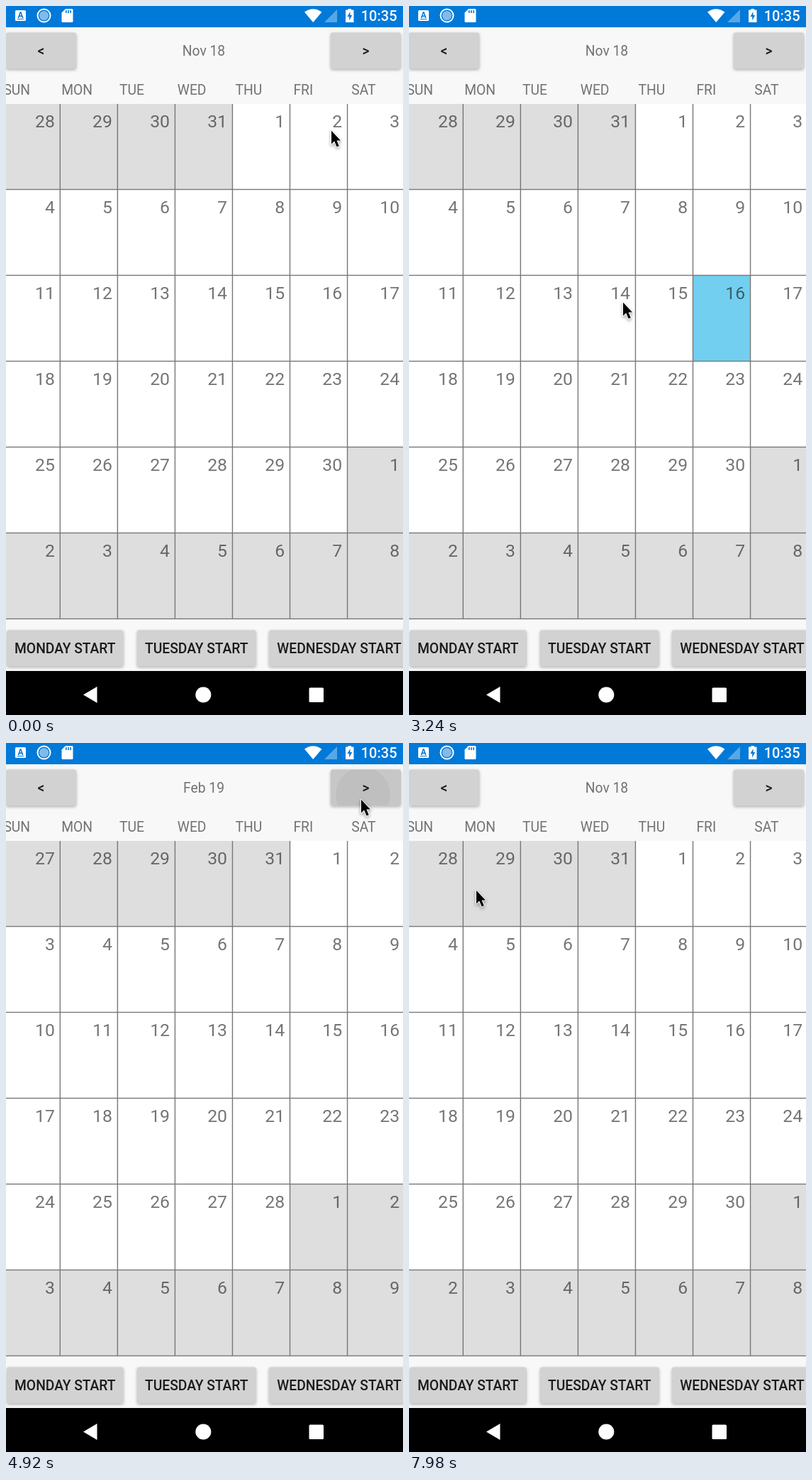
An HTML page with a canvas that plays this animation: 560x999 px, repeating every 8 s.

```html
<!DOCTYPE html>
<html lang="en">
<head>
<meta charset="utf-8">
<title>Calendar</title>
<style>
  html, body { margin: 0; width: 100%; height: 100%; overflow: hidden; background: #f8f8f8; }
  canvas { display: block; width: 560px; height: 999px; }
</style>
</head>
<body>
<canvas id="stage" width="560" height="999"></canvas>
<script>
const ctx = document.getElementById('stage').getContext('2d');
const LOOP = 8000, STEP = 60;
const BLUE = '#0179d8', INK = 'rgba(0,0,0,.54)', DARK = 'rgba(0,0,0,.87)';
const SMALL = 19.3, LARGE = 24.8;
const DAYS = ['SUN', 'MON', 'TUE', 'WED', 'THU', 'FRI', 'SAT'];
const MONTHS = ['Jan', 'Feb', 'Mar', 'Apr', 'May', 'Jun', 'Jul', 'Aug', 'Sep', 'Oct', 'Nov', 'Dec'];
const GRID = { top: 138, bottom: 863, colX: 76, colW: 81.05, rowY: 258, rowH: 121 };

// time, x, y
const POINTER = [
  [0, 459, 175], [700, 125, 455], [900, 125, 455], [1500, 285, 690], [1720, 285, 690],
  [2340, 407, 513], [2700, 440, 450], [2920, 440, 450], [3240, 302, 417], [3400, 302, 417],
  [3960, 501, 79], [5000, 501, 79], [5400, 67, 68], [6660, 67, 68], [7400, 95, 207], [8000, 95, 207]
];
// time, cell index
const PICKS = [[0, -1], [780, 15], [1620, 31], [2820, 19], [4120, -1]];
// press time, direction
const PRESSES = [[4040, 1], [4480, 1], [4760, 1], [5440, -1], [5780, -1], [6160, -1]];
const CHANGE_DELAY = 80;

const NAV = {
  '-1': { x: 0, w: 99, label: '<', hit: [67, 68] },
  '1': { x: 458, w: 99, label: '>', hit: [501, 79] }
};
const STARTS = [[1, 164.5, 'MONDAY START'], [185, 167.5, 'TUESDAY START'], [371, 198, 'WEDNESDAY START']];

function rect(x, y, w, h, fill) {
  ctx.fillStyle = fill;
  ctx.fillRect(x, y, w, h);
}

function rounded(x, y, w, h, r) {
  ctx.beginPath();
  ctx.roundRect(x, y, w, h, r);
}

function disc(x, y, r, fill) {
  ctx.beginPath();
  ctx.arc(x, y, r, 0, Math.PI * 2);
  ctx.fillStyle = fill;
  ctx.fill();
}

function shape(d, fill) {
  ctx.fillStyle = fill;
  ctx.fill(new Path2D(d));
}

function text(str, x, y, size, { align = 'left', weight = 400, fill = INK } = {}) {
  ctx.font = `${weight} ${size}px Roboto, sans-serif`;
  ctx.textAlign = align;
  ctx.fillStyle = fill;
  ctx.fillText(str, x, y);
}

function withShadow(color, blur, dy, draw) {
  ctx.save();
  ctx.shadowColor = color;
  ctx.shadowBlur = blur;
  ctx.shadowOffsetY = dy;
  draw();
  ctx.restore();
}

function button(x, y, w, label) {
  withShadow('rgba(0,0,0,.3)', 4, 1.5, () => {
    rounded(x, y, w, 51, 3);
    ctx.fillStyle = '#d2d2d2';
    ctx.fill();
  });
  text(label, x + w / 2, y + 32.5, SMALL, { align: 'center', weight: 500, fill: DARK });
}

function statusBar() {
  rect(0, 0, 560, 30, BLUE);
  rounded(13, 6, 15, 15, 1.5);
  ctx.fillStyle = '#fff';
  ctx.fill();
  text('A', 20.5, 17, 12, { align: 'center', weight: 700, fill: BLUE });
  rect(16, 18, 9, 1, BLUE);

  disc(53.5, 13.5, 10, '#fff');
  disc(53.5, 13.5, 8, BLUE);
  disc(53.5, 13.5, 6.6, '#80bbed');

  shape('M84 4H93Q94.5 4 94.5 5.5V21.5Q94.5 23 93 23H80Q78.5 23 78.5 21.5V9.5Z', '#fff');
  for (let i = 0; i < 3; i++) rect(84 + 3.2 * i, 6, 1.6, 4, BLUE);

  shape('M421 8.5Q433 0 445.5 8.5L433.2 23Z', '#fff');
  shape('M449 23L467 5V23Z', '#58a7e5');
  shape('M482.5 4H487V5.5H490.5V23H479V5.5H482.5Z', '#fff');
  shape('M485.5 8L481.5 15H484.2V20.5L488.2 13H485.5Z', BLUE);
  text('10:35', 551.5, 21, 20, { align: 'right', weight: 500, fill: '#fff' });
}

function calendar(offset, picked) {
  const month = new Date(2018, 10 + offset, 1);
  const title = `${MONTHS[month.getMonth()]} ${month.getFullYear() % 100}`;
  text(title, 279, 70, SMALL, { align: 'center' });
  DAYS.forEach((day, i) => text(day, -3.6 + 81.8 * i, 125, SMALL));

  const { top, bottom, colX, colW, rowY, rowH } = GRID;
  rect(0, top, 560, bottom - top, '#fff');
  for (let i = 0; i < 42; i++) {
    const col = i % 7, row = Math.floor(i / 7);
    const date = new Date(2018, 10 + offset, 1 + i - month.getDay());
    const outside = date.getMonth() !== month.getMonth();
    const x = Math.round(colX + (col - 1) * colW);
    const y = row ? rowY + (row - 1) * rowH : top;
    const h = rowY + row * rowH - y;
    if (i === picked) rect(x, y, 81, h, '#73cfef');
    else if (outside) rect(x, y, 81, h, '#dedede');
    text(date.getDate(), 68.9 + colW * col, 171 + rowH * row, LARGE, { align: 'right' });
  }
  for (let i = 0; i < 6; i++) {
    rect(colX - 0.4 + i * colW, top, 1.4, bottom - top, '#777');
    rect(0, rowY - 0.2 + i * rowH, 560, 1.4, '#777');
  }
}

function ripple(t) {
  const press = PRESSES.filter(p => p[0] <= t).pop();
  if (!press) return;
  const age = t - press[0];
  if (age >= 380) return;
  const { x, w, hit } = NAV[press[1]];
  const fade = age < 250 ? 1 : (380 - age) / 130;
  const drift = Math.min(1, age / 400);
  ctx.save();
  rounded(x, 37, w, 51, 3);
  ctx.clip();
  rect(x, 37, w, 51, `rgba(0,0,0,${0.05 * fade})`);
  disc(hit[0] + (x + w / 2 - hit[0]) * drift, hit[1] + (63 - hit[1]) * drift,
    Math.min(70, age * 0.24), `rgba(0,0,0,${0.04 * fade})`);
  ctx.restore();
}

function navBar() {
  rect(0, 937, 560, 62, '#000');
  shape('M109 970.5L128.5 959V982Z', '#fff');
  disc(278.3, 970.5, 11, '#fff');
  rounded(427.5, 960.5, 20.5, 20.5, 1.5);
  ctx.fillStyle = '#fff';
  ctx.fill();
}

function pointer(t) {
  const next = POINTER.findIndex(p => p[0] > t);
  const [t0, x0, y0] = POINTER[next - 1], [t1, x1, y1] = POINTER[next];
  const p = (t - t0) / (t1 - t0), e = p * p * (3 - 2 * p);
  const arrow = new Path2D('M0 .8V19.5L4.2 15.6L7.6 23.6L10.8 22.2L7.5 14.4H13Z');
  ctx.save();
  ctx.translate(x0 + (x1 - x0) * e, y0 + (y1 - y0) * e);
  withShadow('rgba(0,0,0,.45)', 4, 2, () => {
    ctx.lineWidth = 1.8;
    ctx.lineJoin = 'round';
    ctx.strokeStyle = '#fff';
    ctx.stroke(arrow);
  });
  ctx.fillStyle = '#000';
  ctx.fill(arrow);
  ctx.restore();
}

function draw(t) {
  const offset = PRESSES.reduce((sum, [at, dir]) => at + CHANGE_DELAY <= t ? sum + dir : sum, 0);
  const picked = PICKS.filter(p => p[0] <= t).pop()[1];
  rect(0, 0, 560, 999, '#f8f8f8');
  statusBar();
  calendar(offset, picked);
  for (const { x, w, label } of Object.values(NAV)) button(x, 37.5, w, label);
  ripple(t);
  for (const [x, w, label] of STARTS) button(x, 879.5, w, label);
  navBar();
  pointer(t);
}

const begin = performance.now();
function tick() {
  const t = (performance.now() - begin) % LOOP;
  draw(Math.floor(t / STEP) * STEP);
  requestAnimationFrame(tick);
}
tick();
</script>
</body>
</html>
```
